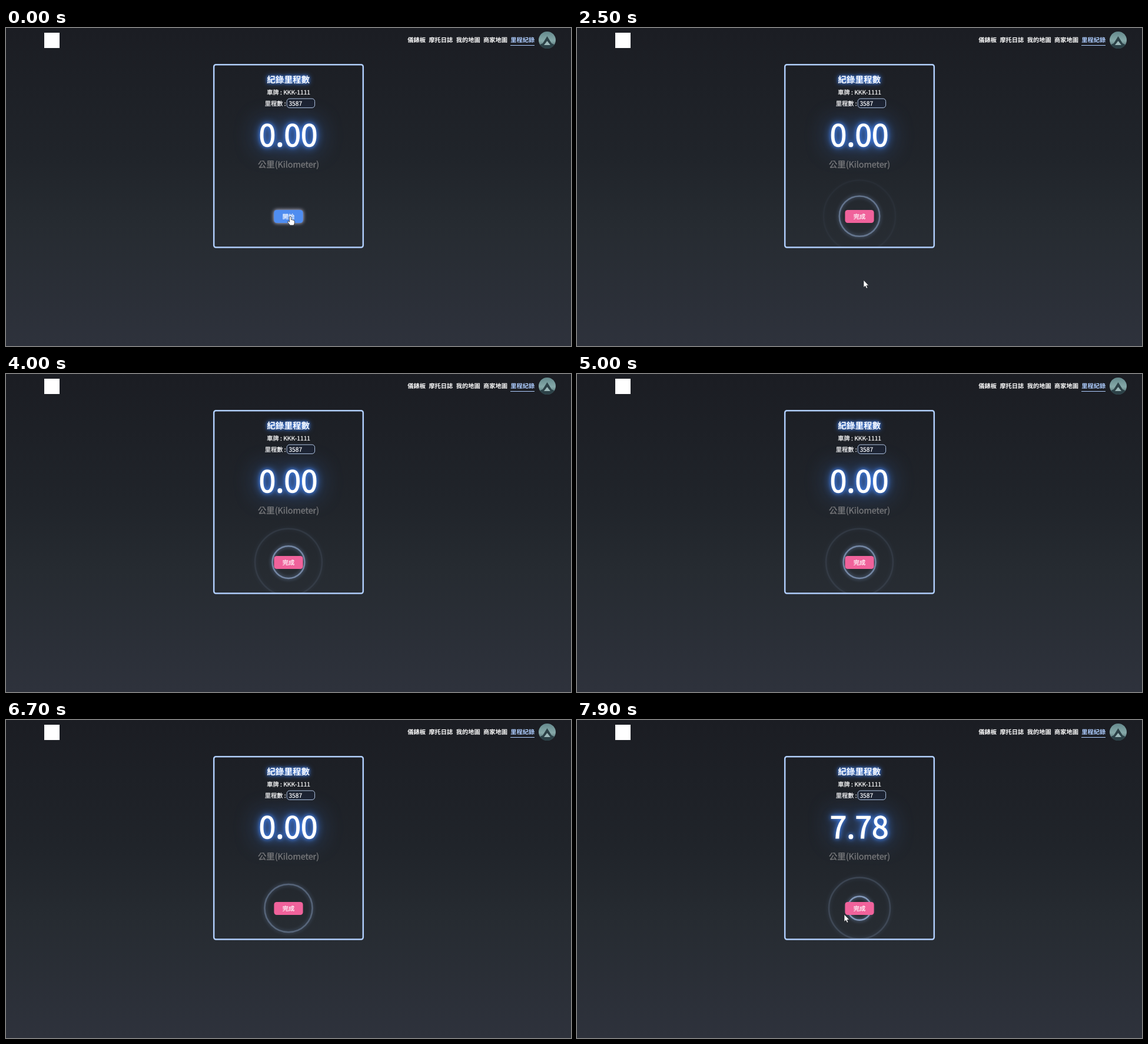
Animation of 960x540 px, one loop 8000 ms. Source, as an HTML page:

```html
<!DOCTYPE html>
<html lang="zh-Hant">
<head>
<meta charset="utf-8">
<title>里程紀錄</title>
<style>
  html, body { margin: 0; width: 100%; height: 100%; overflow: hidden; background: #1b1e24; }
  svg {
    display: block; width: 960px; height: 540px;
    font-family: "Noto Sans CJK TC", "Noto Sans CJK", "Noto Sans TC", "Noto Sans CJK JP", sans-serif;
    font-size: 10.24px; text-rendering: geometricPrecision;
  }
  text { fill: #fff; }
  .mid { text-anchor: middle; }
  .bold { font-weight: 700; }
  .medium { stroke: #fff; stroke-width: .024em; }
  .active { fill: #aecdff; }
  .title { font-size: 14.6px; filter: url(#glowSmall); }
  .count { font-size: 51.2px; filter: url(#glowBig); }
  .unit { font-size: 14.34px; fill: #77787b; stroke: #77787b; }
  .ring { fill: none; stroke: #b2d0ff; stroke-width: 2.5; filter: drop-shadow(0 0 3px #9cc2ff); }
  .start { fill: #4f8df0; filter: drop-shadow(0 0 3px #d3d3f2); }
  .done { fill: #f0629b; }
  .cursor { fill: #fff; stroke: #16181d; stroke-width: .7; stroke-linejoin: round; }
</style>
</head>
<body>
<svg viewBox="0 0 960 540">
  <defs>
    <linearGradient id="sky" x2="0" y2="1">
      <stop offset="0" stop-color="#1b1d23"/>
      <stop offset=".4" stop-color="#20242a"/>
      <stop offset=".62" stop-color="#262b31"/>
      <stop offset="1" stop-color="#2e323c"/>
    </linearGradient>
    <linearGradient id="face" x2="0" y2="1">
      <stop offset="0" stop-color="#64898c"/>
      <stop offset=".55" stop-color="#86a9a9"/>
      <stop offset="1" stop-color="#3f5b60"/>
    </linearGradient>
    <clipPath id="cardClip"><rect x="354" y="63" width="252" height="309"/></clipPath>
    <clipPath id="faceClip"><circle cx="919.5" cy="20.5" r="14.5"/></clipPath>
    <filter id="glowBig" filterUnits="userSpaceOnUse" x="340" y="70" width="280" height="220" color-interpolation-filters="sRGB">
      <feFlood flood-color="#4385f5"/>
      <feComposite in2="SourceAlpha" operator="in" result="tint"/>
      <feGaussianBlur in="tint" stdDeviation="3" result="near"/>
      <feGaussianBlur in="tint" stdDeviation="7" result="mid"/>
      <feGaussianBlur in="tint" stdDeviation="20" result="far"/>
      <feMerge>
        <feMergeNode in="far"/><feMergeNode in="mid"/><feMergeNode in="near"/><feMergeNode in="SourceGraphic"/>
      </feMerge>
    </filter>
    <filter id="glowSmall" filterUnits="userSpaceOnUse" x="400" y="60" width="160" height="56" color-interpolation-filters="sRGB">
      <feFlood flood-color="#4385f5"/>
      <feComposite in2="SourceAlpha" operator="in" result="tint"/>
      <feGaussianBlur in="tint" stdDeviation="2" result="near"/>
      <feGaussianBlur in="tint" stdDeviation="5" result="far"/>
      <feMerge>
        <feMergeNode in="far"/><feMergeNode in="near"/><feMergeNode in="SourceGraphic"/>
      </feMerge>
    </filter>
  </defs>

  <rect width="960" height="540" fill="url(#sky)"/>

  <rect x="65" y="8" width="26" height="26" fill="#fff"/>
  <g class="bold">
    <text x="682.2" y="24.4">儀錶板</text>
    <text x="718.4" y="24.4">摩托日誌</text>
    <text x="764.8" y="24.4">我的地圖</text>
    <text x="811" y="24.4">商家地圖</text>
    <text x="857.2" y="24.4" class="active">里程紀錄</text>
  </g>
  <rect x="857" y="29" width="41" height="1" fill="#aecdff"/>
  <g clip-path="url(#faceClip)">
    <rect x="905" y="6" width="29" height="29" fill="url(#face)"/>
    <path d="M904 30 L912 26 L919.5 14 L927 26 L935 30 V36 H904 Z" fill="#2c4147"/>
    <path d="M914 29 L919.5 22 L925 29 Z" fill="#9bb7b8"/>
  </g>

  <text class="mid bold title" x="479.7" y="92.5">紀錄里程數</text>
  <text class="mid medium" x="480.2" y="113.4">車牌 : KKK-1111</text>
  <text class="medium" x="439.8" y="132">里程數 :</text>
  <rect x="477.2" y="120" width="47.4" height="15.4" rx="4.5" fill="#1c2230" stroke="#c3d8f8" stroke-width=".9"/>
  <text class="medium" x="480.4" y="132">3587</text>
  <text class="mid medium count" id="count" x="479.6" y="201.3">0.00</text>
  <text class="mid medium unit" x="480" y="236.8">公里(Kilometer)</text>

  <g id="rings" clip-path="url(#cardClip)">
    <circle class="ring" cx="480" cy="319.6"/>
    <circle class="ring" cx="480" cy="319.6"/>
  </g>
  <rect x="353.2" y="62.2" width="253.6" height="310.4" rx="3.5" fill="none" stroke="#b0cefc" stroke-width="2.5"/>

  <rect id="button" x="455.4" y="309" width="49.2" height="22" rx="4.5"/>
  <text class="mid medium" id="label" x="480" y="324.4"></text>

  <path class="cursor" id="hand" d="M-1.5 1 Q0 -.8 1.4 1 V5.6 Q3 4.7 3.8 6.1 Q5.2 5.4 5.8 6.8 Q7.3 6.4 7.3 8.2 V11 Q7 13.2 5.8 15 H-.4 Q-2 12.4 -4.2 10 Q-5.3 8.4 -4 8 Q-2.9 7.8 -1.5 9.6 Z"/>
  <path class="cursor" id="arrow" d="M0 0 V12.6 L2.8 10 L4.8 14.3 L6.9 13.3 L5 9.2 H8.8 Z"/>
</svg>
<script>
const LOOP = 8000, STEP = 100;
const PRESS = 2100, COUNTED = 7000, STALL = 3500;
const LEAVE = { from: 2200, to: 2600, a: [483, 320], b: [490, 512], ease: u => u * u };
const ENTER = { from: 7500, to: 7900, a: [398, 481], b: [454, 330], ease: u => u * (2 - u) };

const $ = id => document.getElementById(id);
const rings = [...$('rings').children];
const clamp = u => Math.min(1, Math.max(0, u));

// cubic-bezier(0, .2, .8, 1)
function ripple(p) {
  let lo = 0, hi = 1;
  for (let i = 0; i < 24; i++) {
    const s = (lo + hi) / 2;
    if (2.4 * s * s - 1.4 * s ** 3 < p) lo = s; else hi = s;
  }
  const r = 1 - lo;
  return .6 * lo * r * r + 3 * r * lo * lo + lo ** 3;
}

function drawRings(t) {
  const age = t - PRESS - (t >= STALL ? STEP : 0);
  rings.forEach((ring, i) => {
    const e = ripple((age / 1000 + i / 2) % 1);
    ring.setAttribute('r', Math.max(0, 64.5 * e - 1.25));
    ring.style.opacity = 1 - e;
  });
}

function drawCursor(t) {
  const move = t < 5000 ? LEAVE : ENTER;
  const shown = t <= LEAVE.to || t >= ENTER.from;
  const isHand = t <= LEAVE.from;
  const u = move.ease(clamp((t - move.from) / (move.to - move.from)));
  const [x, y] = move.a.map((v, i) => v + (move.b[i] - v) * u);
  for (const [id, on] of [['hand', isHand], ['arrow', !isHand]]) {
    $(id).setAttribute('transform', `translate(${x} ${y})`);
    $(id).style.display = shown && on ? '' : 'none';
  }
}

function draw(t) {
  const running = t >= PRESS;
  $('button').setAttribute('class', running ? 'done' : 'start');
  $('label').textContent = running ? '完成' : '開始';
  $('count').textContent = t >= COUNTED ? '7.78' : '0.00';
  $('rings').style.display = running ? '' : 'none';
  if (running) drawRings(t);
  drawCursor(t);
}

const began = performance.now();
function tick() {
  const t = (performance.now() - began) % LOOP;
  draw(Math.floor(t / STEP) * STEP);
  requestAnimationFrame(tick);
}
tick();
</script>
</body>
</html>
```
